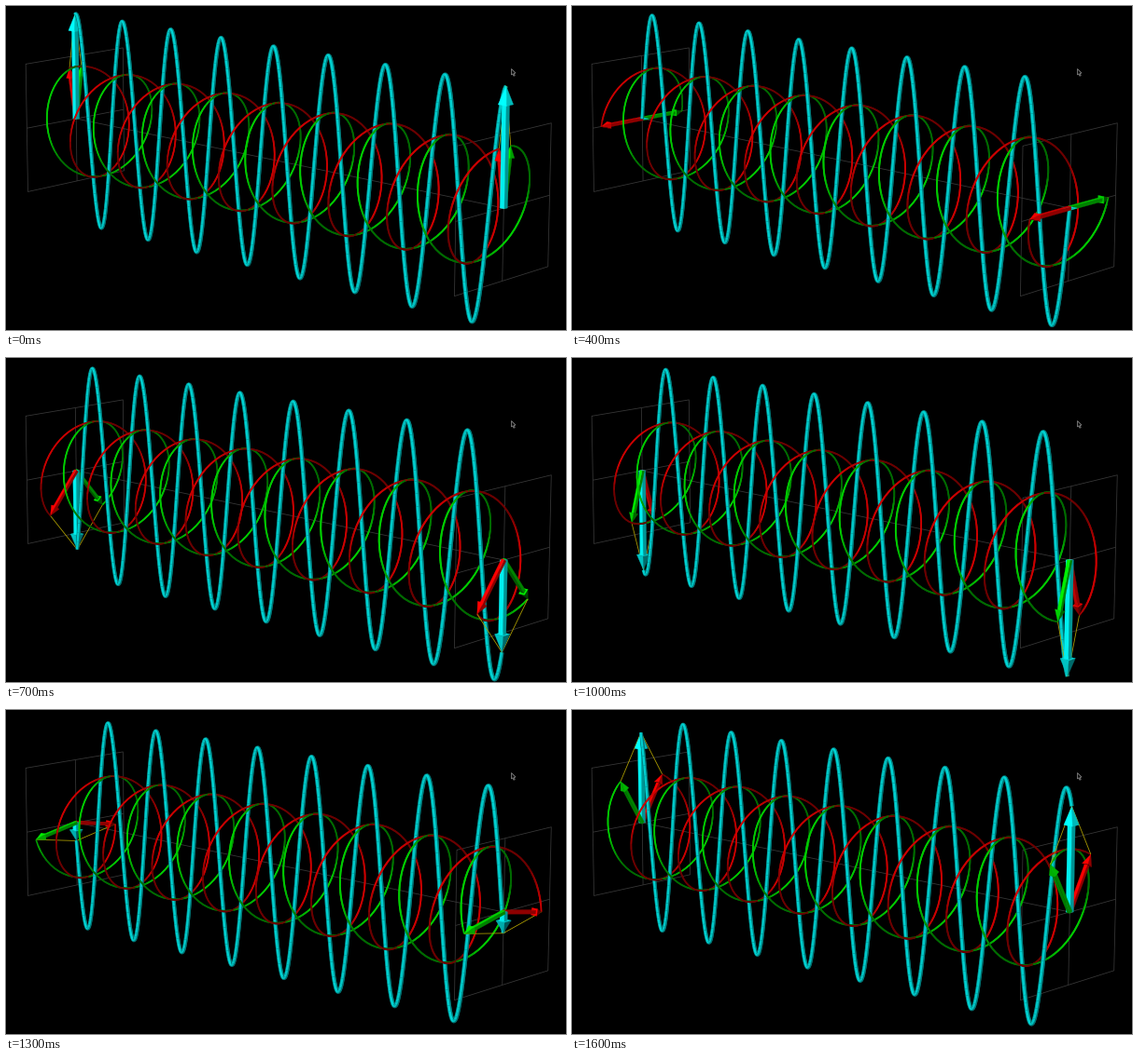
A matplotlib script that plays this animation: 600x348 px, repeating every 1.7 s.

```python
import numpy as np
import matplotlib.pyplot as plt
from matplotlib.animation import FuncAnimation
from matplotlib.collections import LineCollection, PolyCollection

# Linear polarisation as the sum of two opposite circular waves.
# World units: wave amplitude = 1, x sideways, y up, z along propagation.
W, H, DPI = 600, 348, 100
FRAMES, INTERVAL = 17, 100
LENGTH, WAVES, RADIUS, PANEL = 5.1, 8, 0.5, 0.6
PX = 72 / DPI

VIEW = np.array([-0.72, 0.18, 0.67])
LIGHT = np.array([-0.72, 0.60, 0.34])
RED = np.array([1.0, 0, 0])
GREEN = np.array([0, 1.0, 0])
CYAN = np.array([0, 1.0, 1.0])
GLINT = np.array([-0.4, -0.2])  # lit side of the thick tube, in pixels

# Phase in degrees against frame number; the pace is slightly uneven.
KEY_FRAMES = [0, 2, 5, 7, 10, 13, 16, 17]
KEY_PHASES = [8.5, 50.5, 110, 139.5, 196, 260, 329, 368.5]


def project(p):
    """Perspective view: returns pixel positions and depth."""
    p = np.asarray(p, float)
    u, v, s = p[..., 0] / PANEL, p[..., 1], p[..., 2] / LENGTH
    depth = 1 + 0.02 * u - 0.008 * v - 0.153 * s
    x = (75.2 + 53.3 * u - 2.1 * v + 376.5 * s) / depth
    y = (121 - 7.6 * u - 113 * v + 62.8 * s) / depth
    return np.stack([x, y], axis=-1), depth


def tube_light(points):
    """Light on the side of a thin tube that faces the viewer."""
    t = np.gradient(points, axis=0)
    t /= np.linalg.norm(t, axis=1, keepdims=True)
    n = VIEW - (t @ VIEW)[:, None] * t
    n /= np.linalg.norm(n, axis=1, keepdims=True)
    return n @ LIGHT


def field(phase, z):
    """Red, green and summed vectors at position z."""
    psi = phase - 2 * np.pi * WAVES * z / LENGTH
    sin, cos = RADIUS * np.sin(psi), RADIUS * np.cos(psi)
    red = np.stack([-sin, cos, z], axis=-1)
    green = np.stack([sin, cos, z], axis=-1)
    total = np.stack([0 * sin, 2 * cos, z], axis=-1)
    return red, green, total


Z = np.linspace(0, LENGTH, WAVES * 56 + 1)


def wave_strokes(phase):
    """Short strokes of all three curves, far ones first."""
    strokes = []

    def add(points, layers):
        xy, depth = project(points)
        for i in range(len(xy) - 2):
            d = depth[i + 1]
            for order, (width, colors) in enumerate(layers):
                strokes.append((-d, order, xy[i:i + 3] + order * GLINT,
                                width * PX / d, colors[i + 1]))

    red, green, total = field(phase, Z)
    for points, color in ((red, RED), (green, GREEN)):
        b = np.clip(1.3 * tube_light(points) - 0.3, 0.42, 0.8)
        add(points, [(1.6, b[:, None] * color)])
    b = np.clip(0.62 + 0.24 * tube_light(total), 0.5, 0.84)[:, None]
    add(total, [(3.9, 0.58 * b * CYAN), (2.2, b * CYAN)])
    strokes.sort(key=lambda k: k[:2])
    return strokes


def arrow_faces(base, tip, width, head, color, gain):
    """Visible faces of a square arrow with a pyramid head."""
    axis = tip - base
    size = np.linalg.norm(axis)
    d = axis / size
    side = np.array([-d[1], d[0], 0])
    fwd = np.array([0, 0, 1.0])
    head = min(head, 0.6 * size)
    neck = tip - head * d

    def ring(center, w):
        return [center + w / 2 * (a * side + b * fwd)
                for a, b in ((1, 1), (-1, 1), (-1, -1), (1, -1))]

    normals = [fwd, -side, -fwd, side]
    start, end, rim = ring(base, width), ring(neck, width), ring(neck, 2 * width)
    shaft, point = [(start, -d)], []
    for i, n in enumerate(normals):
        j = (i + 1) % 4
        shaft.append(([start[i], start[j], end[j], end[i]], n))
        slope = head * n + width * d
        point.append(([rim[i], rim[j], tip], slope / np.linalg.norm(slope)))
    point.append((rim, -d))
    faces = shaft + point if d @ VIEW > 0 else point + shaft

    result = []
    for corners, n in faces:
        if n @ VIEW > 0:
            b = gain * (0.25 + 0.9 * max(0, n @ LIGHT))
            result.append((project(corners)[0], np.clip(b * color, 0, 1)))
    return result


def arrow_group(phase, z):
    """Faces of the three arrows and the parallelogram edges."""
    red, green, total = field(phase, np.array(z, float))
    base = np.array([0, 0, z], float)
    specs = [(red, 0.029, 0.095, RED, 1.0),
             (green, 0.029, 0.095, GREEN, 0.92),
             (total, 0.043, 0.15, CYAN, 1.05)]
    specs.sort(key=lambda a: -project(a[0])[1])
    faces = []
    for tip, width, head, color, gain in specs:
        faces += arrow_faces(base, tip, width, head, color, gain)
    edges = [project([red, total])[0], project([green, total])[0]]
    return faces, edges


fig = plt.figure(figsize=(W / DPI, H / DPI), dpi=DPI, facecolor="black")
ax = fig.add_axes([0, 0, 1, 1])
ax.set_xlim(0, W)
ax.set_ylim(H, 0)
ax.axis("off")

# Frames at both ends and the axis between them
grid = [[(0, 0, 0), (0, 0, LENGTH)]]
for z in (0, LENGTH):
    q = PANEL
    grid += [[(-q, q, z), (q, q, z), (q, -q, z), (-q, -q, z), (-q, q, z)],
             [(-q, 0, z), (q, 0, z)], [(0, -q, z), (0, q, z)]]
ax.add_collection(LineCollection([project(g)[0] for g in grid],
                                 colors="#383838", linewidths=0.8 * PX, zorder=1))

# Mouse pointer
ax.add_patch(plt.Polygon([(541.5, 67.5), (541.5, 74), (543, 72.8), (544, 75.2),
                          (545.2, 74.6), (544.2, 72.4), (546, 72)],
                         facecolor="#101010", edgecolor="#848484",
                         linewidth=0.8 * PX, zorder=9))

waves = ax.add_collection(LineCollection([], capstyle="butt", zorder=4))
ends = []
for z, level in ((0, 2), (LENGTH, 5)):
    ties = ax.add_collection(LineCollection([], colors="#b0a000",
                                            linewidths=0.8 * PX, zorder=level))
    solid = ax.add_collection(PolyCollection([], edgecolors="face",
                                             linewidths=0.2, zorder=level + 0.5))
    ends.append((z, ties, solid))


def update(frame):
    phase = np.radians(np.interp(frame, KEY_FRAMES, KEY_PHASES))
    strokes = wave_strokes(phase)
    waves.set_segments([s[2] for s in strokes])
    waves.set_linewidths([s[3] for s in strokes])
    waves.set_color([s[4] for s in strokes])
    for z, ties, solid in ends:
        faces, edges = arrow_group(phase, z)
        ties.set_segments(edges)
        solid.set_verts([f[0] for f in faces])
        solid.set_facecolor([f[1] for f in faces])
    return [waves] + [a for e in ends for a in e[1:]]


anim = FuncAnimation(fig, update, frames=FRAMES, interval=INTERVAL,
                     repeat=True, repeat_delay=0, blit=False)
plt.show()
```
